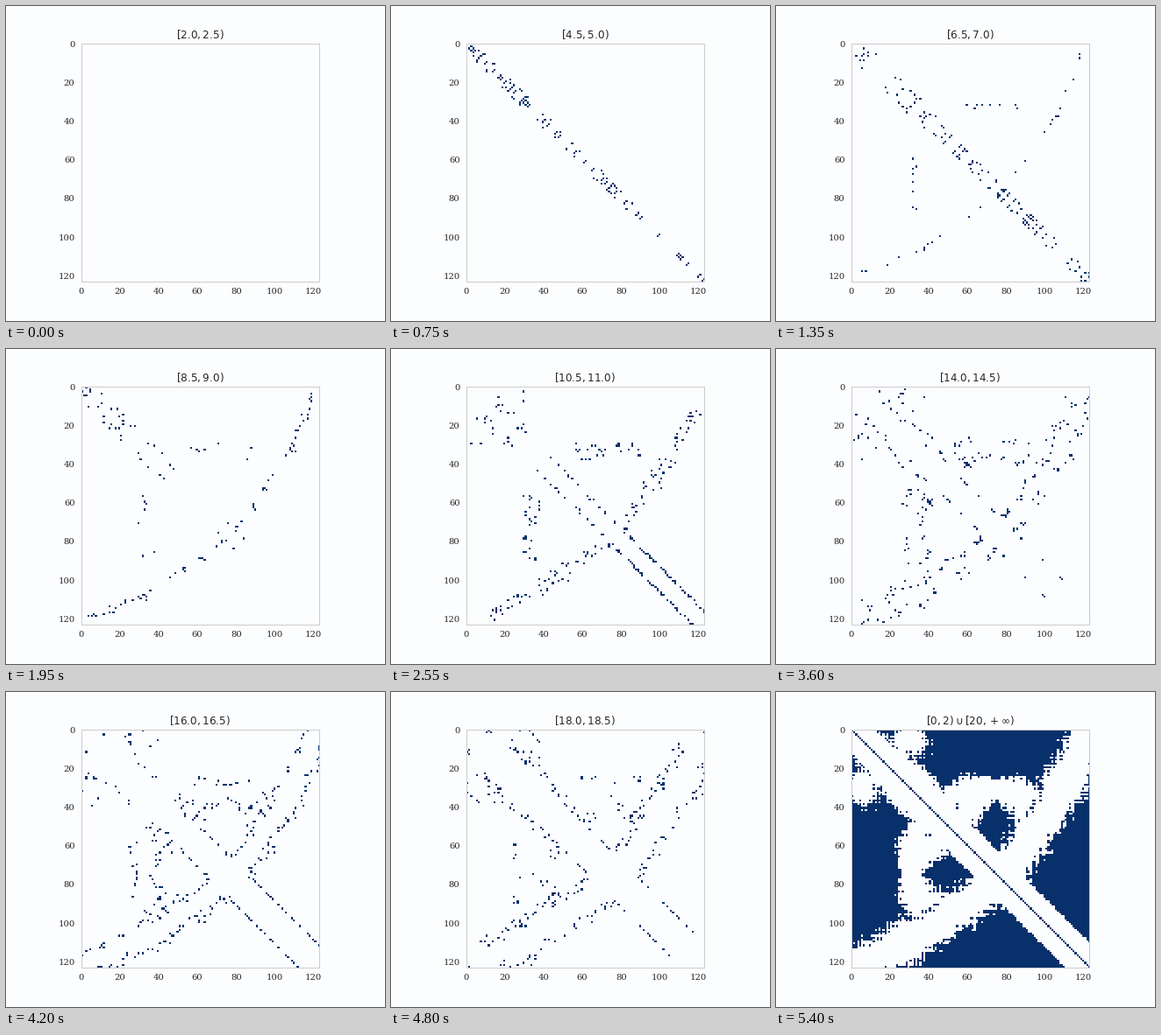
Recreate the animation shown at these times as a matplotlib script. Size 432 by 360 pixels, loop 5.55 s.

```python
import numpy as np
import matplotlib.pyplot as plt
from matplotlib.animation import FuncAnimation
from matplotlib.colors import ListedColormap

SIZE = 123      # residues in the chain
BINS = 36       # half-unit bins from 2 to 20, followed by the remainder
PAPER, NAVY, INK, EDGE = "#fcfdff", "#08306b", "#262626", "#cccccc"

plt.rcParams.update({
    "font.family": "DejaVu Serif",
    "font.size": 10,
    "mathtext.fontset": "dejavusans",
    "text.color": INK,
    "xtick.color": INK,
    "ytick.color": INK,
    "axes.edgecolor": EDGE,
    "axes.linewidth": 1,
})


def helix_distance(row, col):
    """Distance along a coil whose rise per residue varies with position."""
    rise = np.interp(np.arange(SIZE), [0, 20, 25, 38, 44, 122],
                     [1.3, 1.3, 1.05, 1.05, 1.48, 1.48])
    height = np.cumsum(rise)
    turn = 6.6 * np.sin(np.radians(50) * (col - row))
    return np.hypot(height[col] - height[row], turn)


def spread(offset, reach, floor=7.5):
    """Distance rising from floor at a contact to 20 or so at its reach."""
    return floor + 12.5 * (np.abs(offset) / reach) ** 0.75


def packing_distance(row, col):
    """Distance to the nearest contact between separate chain segments."""
    ridge = np.interp(row, [0, 8, 16, 24, 31, 37, 46, 60, 70, 77],
                      [118, 117, 115, 110, 108, 105, 98, 89, 81, 77])
    hairpin = spread(col - ridge, np.interp(row, [0, 10, 18], [8, 9, 12]))

    side = np.abs(col - 74)
    gap = 8 + 0.9 * np.maximum(np.abs(col - 72) - 14, 0)
    reach = np.where(row > 31, 5 + 1.2 * side, 5.5 + 0.2 * side)
    strand = spread(row - 31, reach, gap)

    terminus = spread(np.hypot(col - 30, row - 3), 10)
    return np.minimum(np.minimum(hairpin, strand), terminus)


def distance_map():
    rng = np.random.default_rng(12)
    row, col = np.triu_indices(SIZE, 1)
    index = np.arange(SIZE)

    # Side chains facing in or out give the periodic row and column texture.
    facing = 1.4 * np.cos(np.radians(np.where(index < 45, 170, 100)) * index)
    facing += rng.normal(0, 0.6, SIZE)
    facing[:2] += 3
    shift = facing[row] + facing[col]
    wobble = rng.normal(0, 1, row.size)

    # The coil is regular towards the end of the chain and loose before it.
    loose = np.where(col < 45, np.clip((col - row - 1) / 4, 0, 1), 0)
    jitter = np.interp(col, [75, 90], [0.6, 0.3]) + 1.2 * loose
    along = helix_distance(row, col) + jitter * wobble + 0.8 * loose * shift

    across = packing_distance(row, col)
    across += (shift + 0.9 * wobble) * np.clip(across / 15, 0, 1)

    result = np.zeros((SIZE, SIZE))
    result[row, col] = np.maximum(np.minimum(along, across), 3.6)
    return result + result.T


distances = distance_map()

fig = plt.figure(figsize=(6, 5), dpi=72, facecolor=PAPER)
fig.subplots_adjust(left=0.125, right=0.9, bottom=0.125, top=0.88)
ax = fig.add_subplot(facecolor=PAPER)
image = ax.imshow(np.zeros((SIZE, SIZE)), cmap=ListedColormap([PAPER, NAVY]),
                  vmin=0, vmax=1, interpolation="nearest",
                  extent=(0, SIZE, SIZE, 0))
ax.set_xticks(range(0, SIZE, 20))
ax.set_yticks(range(0, SIZE, 20))
ax.tick_params(length=0, pad=7)
title = ax.set_title("", fontsize=12, pad=6)


def draw(frame):
    if frame < BINS:
        low = 2 + frame / 2
        high = low + 0.5
        mask = (distances >= low) & (distances < high)
        title.set_text(f"$[{low:.1f}, {high:.1f})$")
    else:
        mask = (distances < 2) | (distances >= 20)
        title.set_text(r"$[0, 2) \cup [20, +\infty)$")
    image.set_data(mask.astype(float))
    return image, title


animation = FuncAnimation(fig, draw, frames=BINS + 1, interval=150,
                          repeat=True, repeat_delay=0)
plt.show()
```
